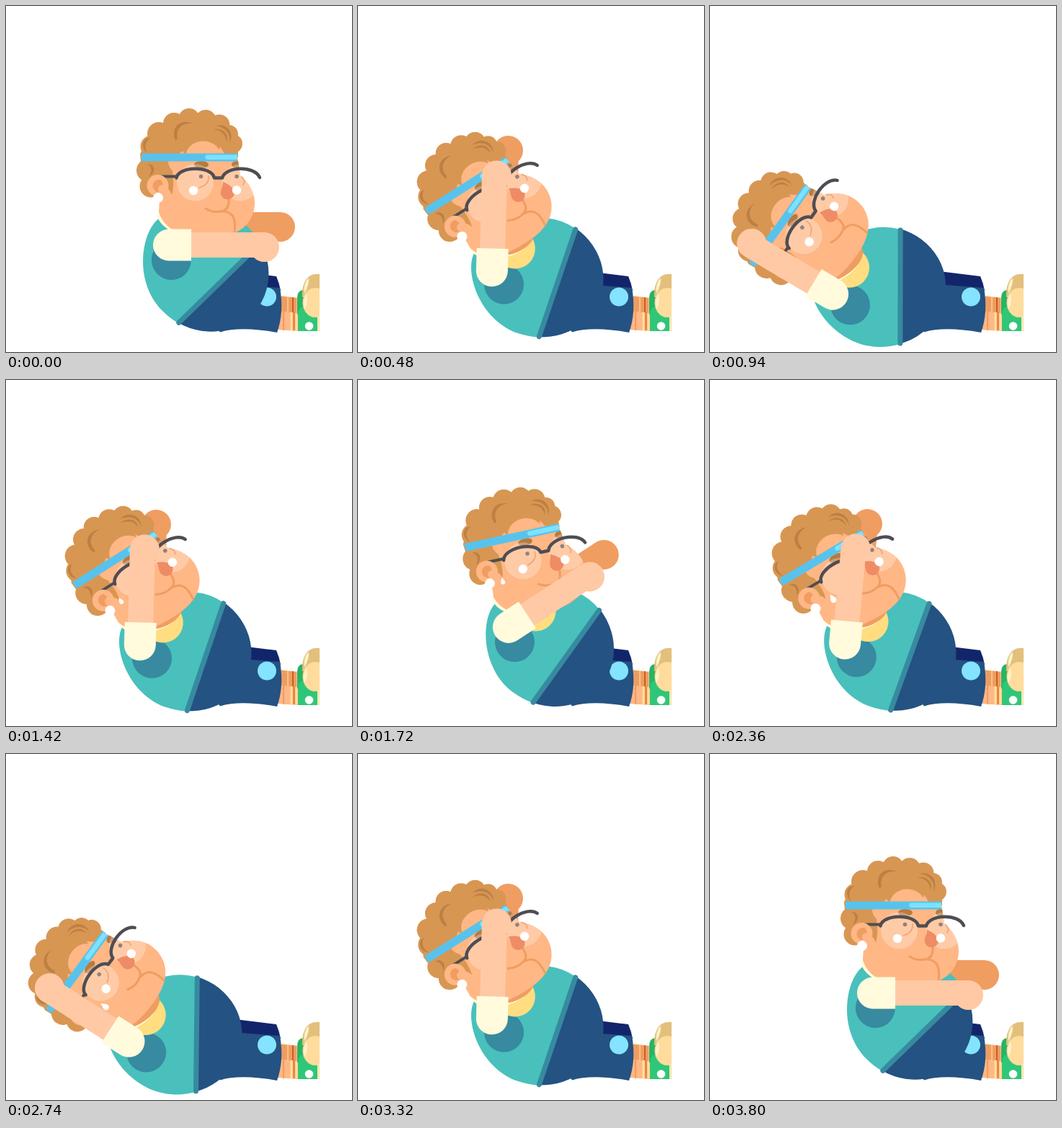
An HTML page that plays this animation: 480x480 px, repeating every 3.82 s.

```html
<!DOCTYPE html>
<html lang="en">
<head>
<meta charset="utf-8">
<title>Sit-ups</title>
<style>
html, body { margin: 0; width: 100%; height: 100%; overflow: hidden; background: #fff; }
svg { display: block; width: 100vw; height: 100vh; }
.line { fill: none; stroke-linecap: round; stroke-linejoin: round; }
</style>
</head>
<body>
<svg viewBox="0 0 480 480">
  <defs>
    <clipPath id="shortsClip"><path d="M264 290H340V480H264Z"/></clipPath>
    <clipPath id="shoeClip"><path d="M400 365H435V460H400Z"/></clipPath>
    <path id="face" d="M225 208H321L325 235C337 245 345 258 345 273C345 293 333 309 316 315Q300 322 270 320Q222 318 212 286L214 250Z"/>
    <clipPath id="faceClip"><use href="#face"/></clipPath>
    <path id="drop" d="M0-7C2-3 4-1 4 2A4 4 0 0 1-4 2C-4-1-2-3 0-7Z" fill="#fff"/>
    <g id="forearm">
      <path d="M20-17.500H132V17.500H20Z"/>
      <circle cx="132.500" cy="3" r="20.500"/>
    </g>
  </defs>

  <use id="farArm" href="#forearm" fill="#f09d62"/>

  <g id="legs">
    <path d="M378 402L406 405V427H378Z" fill="#ee9d62"/>
    <path d="M391 403V426M404 405V426" stroke="#ffcf8e" stroke-width="1.500"/>
    <path d="M398 404V426" stroke="#cf5b23" stroke-width="2"/>
    <path d="M376 423L406 426V451L376 449Z" fill="#ffb785"/>
    <path d="M385 424V450" stroke="#ee9d62" stroke-width="2"/>
    <path d="M396 425V450M403 426V450" stroke="#ffe09a" stroke-width="3"/>
    <path d="M399.500 425V450" stroke="#e2742f" stroke-width="2"/>
    <g clip-path="url(#shoeClip)">
      <path d="M413 394C406 394 404 399 404 406V428H414Z" fill="#25b566"/>
      <path d="M435 372C419 370 410 382 411 404H435Z" fill="#e2c07c"/>
      <path d="M414 399Q412 384 420 377Q421 386 414 399Z" fill="#fff0c8"/>
      <path d="M405 425Q406 419 412 417L432 426V451H405Z" fill="#2fc777"/>
      <ellipse cx="429" cy="411.500" rx="17.500" ry="20.500" fill="#ffdc9c"/>
      <path d="M414 421Q411 407 417 399Q420 410 414 421Z" fill="#fff0c8"/>
      <circle cx="420.500" cy="444" r="5.800" fill="#fff"/>
    </g>
    <path d="M433.800 430V451" stroke="#ffe6b5" stroke-width="3"/>
    <path d="M310 367L375 375Q379 384 381 395L310 392Z" fill="#12256b"/>
    <path d="M285 387H327L380 391Q386 425 376 453Q325 444 297 452.500L280 430Z" fill="#245282"/>
    <circle cx="362" cy="403.500" r="13" fill="#84e3ff"/>
  </g>

  <g id="torso">
    <path d="M264 310Q242 304 222 309C172 317 141 350 141 392C141 422 181 473 235 473Q250 473 264 469Z" fill="#49c0bc"/>
    <ellipse cx="237" cy="389" rx="90" ry="83.500" fill="#245282" clip-path="url(#shortsClip)"/>
    <path d="M264 311V468" class="line" stroke="#378aa0" stroke-width="7"/>
    <circle cx="194.500" cy="415" r="27.500" fill="#378aa0"/>
    <circle cx="193" cy="363" r="28" fill="#ffdd80"/>
    <ellipse rx="43" ry="22" transform="translate(171 361) rotate(-30)" fill="#fffbdc"/>
    <ellipse rx="41" ry="22" transform="translate(175 356) rotate(-30)" fill="#f09d62"/>
  </g>

  <g id="head">
    <g fill="#d89653">
      <g id="curls"></g>
      <path d="M200 180L215 168L300 166L322 195V210H235L232 250L216 266L190 250L186 205Z"/>
    </g>
    <g fill="#bd7f43">
      <path d="M235 186C228 170 241 155 259 163C244 161 235 171 238 184Z"/>
      <path d="M291 166C306 162 318 176 310 191C313 177 304 168 291 166Z"/>
      <path d="M288 171C301 169 310 178 306 189C305 178 299 173 288 171Z"/>
      <path d="M201 183C188 182 187 198 196 204C191 196 193 187 201 183Z"/>
      <path d="M196 219C208 219 208 232 198 237C203 230 203 223 196 219Z"/>
    </g>
    <path d="M249 210C250 180 297 180 299 210ZM237 208L245 201L250 208ZM294 208L297 195L305 208Z" fill="#ffb785"/>
    <use href="#face" fill="#ffb785"/>
    <path d="M216 208H226Q222 220 231 229Q234 248 230 262Q226 250 214 246Z" fill="#d89653"/>
    <g clip-path="url(#faceClip)">
      <ellipse cx="271" cy="220" rx="10" ry="5" fill="#b97a3f"/>
      <ellipse cx="320" cy="220" rx="7" ry="5" fill="#b97a3f"/>
      <g fill="#fff" fill-opacity=".28">
        <circle cx="262.500" cy="245" r="25.500"/>
        <circle cx="325" cy="245" r="25.500"/>
      </g>
    </g>
    <path d="M281 236Q282 248 268 252M327 237Q333 243 329 248" class="line" stroke="#f2a779" stroke-width="1.800"/>
    <g fill="#94817b"><circle cx="270.500" cy="236.500" r="2.800"/><circle cx="320" cy="236.500" r="2.800"/></g>
    <path d="M277 281Q288 288 302 284Q310 281 309 266M302 285C317 286 319 299 317 314" class="line" stroke="#f09d62" stroke-width="3"/>
    <path d="M301 244C309 247 317 253 317 260A9.700 9.700 0 0 1 298 261C297 255 301 252 301 244Z" fill="#ee8c66"/>
    <circle cx="260" cy="256" r="6.200" fill="#fff"/>
    <circle cx="320" cy="255.500" r="6.200" fill="#fff"/>
    <path d="M188 204.500H321V215.500H188Z" fill="#57c3ed"/>
    <path d="M321 206.500H279A3.300 3.300 0 0 0 279 213H321Z" fill="#7ce2ff"/>
    <path d="M215 236.500H237" stroke="#4f4d54" stroke-width="4"/>
    <path d="M236.500 238.500C239 222 285 221 289 238.500H300C305 222 345 221 352 238" class="line" stroke="#4f4d54" stroke-width="4.500"/>
    <circle cx="210.500" cy="249" r="15" fill="#ffb785"/>
    <path d="M216 242A8.500 8.500 0 1 0 212 258Q208 250 218 248Z" fill="#f09d62"/>
    <circle cx="211" cy="266" r="7" fill="#fff"/>
    <use id="dropA" href="#drop"/>
    <use id="dropB" href="#drop"/>
  </g>

  <g id="nearArm">
    <use href="#forearm" fill="#ffc9a5"/>
    <path d="M31-22H0A22 22 0 0 0 0 22H31Z" fill="#fffbdc"/>
  </g>
</svg>
<script>
const LOOP = 3820, REP = 1900;
const HIP = [286, 425], NECK = [220, 303], SHOULDER = [226, 331.5];
const LEAN = 45.7, NOD = 8.7, SWING = 149.3;
const el = id => document.getElementById(id);
const pose = (id, transform) => el(id).setAttribute('transform', transform);

// Curl circles: x, y, radius
el('curls').innerHTML = [
  [212, 177, 16], [233, 163, 15], [254, 157, 15], [277, 159, 15], [296, 165, 14.5],
  [309, 178, 13], [315, 191, 13], [202, 195, 15.5], [197, 228, 16], [201, 250, 15.5]
].map(([x, y, r]) => `<circle cx="${x}" cy="${y}" r="${r}"/>`).join('');

// Steady speed, then a soft landing on the floor
function recline(ms) {
  const easeAt = 720, rest = 900, slope = 1 / 810;
  if (ms <= easeAt) return ms * slope;
  if (ms >= rest) return 1;
  return 1 - (rest - ms) ** 2 / (2 * (rest - easeAt)) * slope;
}

function aroundHip([x, y], degrees) {
  const a = degrees * Math.PI / 180, dx = x - HIP[0], dy = y - HIP[1];
  return [HIP[0] + dx * Math.cos(a) - dy * Math.sin(a), HIP[1] + dx * Math.sin(a) + dy * Math.cos(a)];
}

function sweat(id, t, start, end, from, to, size) {
  const k = (t - start) / (end - start);
  const s = k > 0 && k < 1 ? size * Math.min(1, k * 5, (1 - k) * 5) : 0;
  const at = from.map((v, i) => v + (to[i] - v) * k);
  pose(id, `translate(${at}) scale(${s})`);
}

function draw() {
  const t = Math.floor(performance.now() % LOOP / 20) * 20;
  const u = t % REP;
  const p = recline(Math.min(u, REP - u));
  const [sx, sy] = aroundHip(SHOULDER, -LEAN * p);
  const x = sx - 7 * p, y = sy - 3 * p;

  pose('torso', `rotate(${45.8 - LEAN * p} ${HIP})`);
  pose('head', `rotate(${-LEAN * p} ${HIP}) rotate(${-NOD * p} ${NECK})`);
  pose('nearArm', `translate(${x} ${y}) rotate(${-SWING * p})`);
  pose('farArm', `translate(${x + 22 - 10 * p} ${y - 28 - 11 * p}) rotate(${-SWING * p})`);
  sweat('dropA', t, 1700, 3000, [237, 262], [240, 271], 1);
  sweat('dropB', t, 1200, 2300, [232, 260], [226, 274], 0.75);
  requestAnimationFrame(draw);
}
draw();
</script>
</body>
</html>
```
